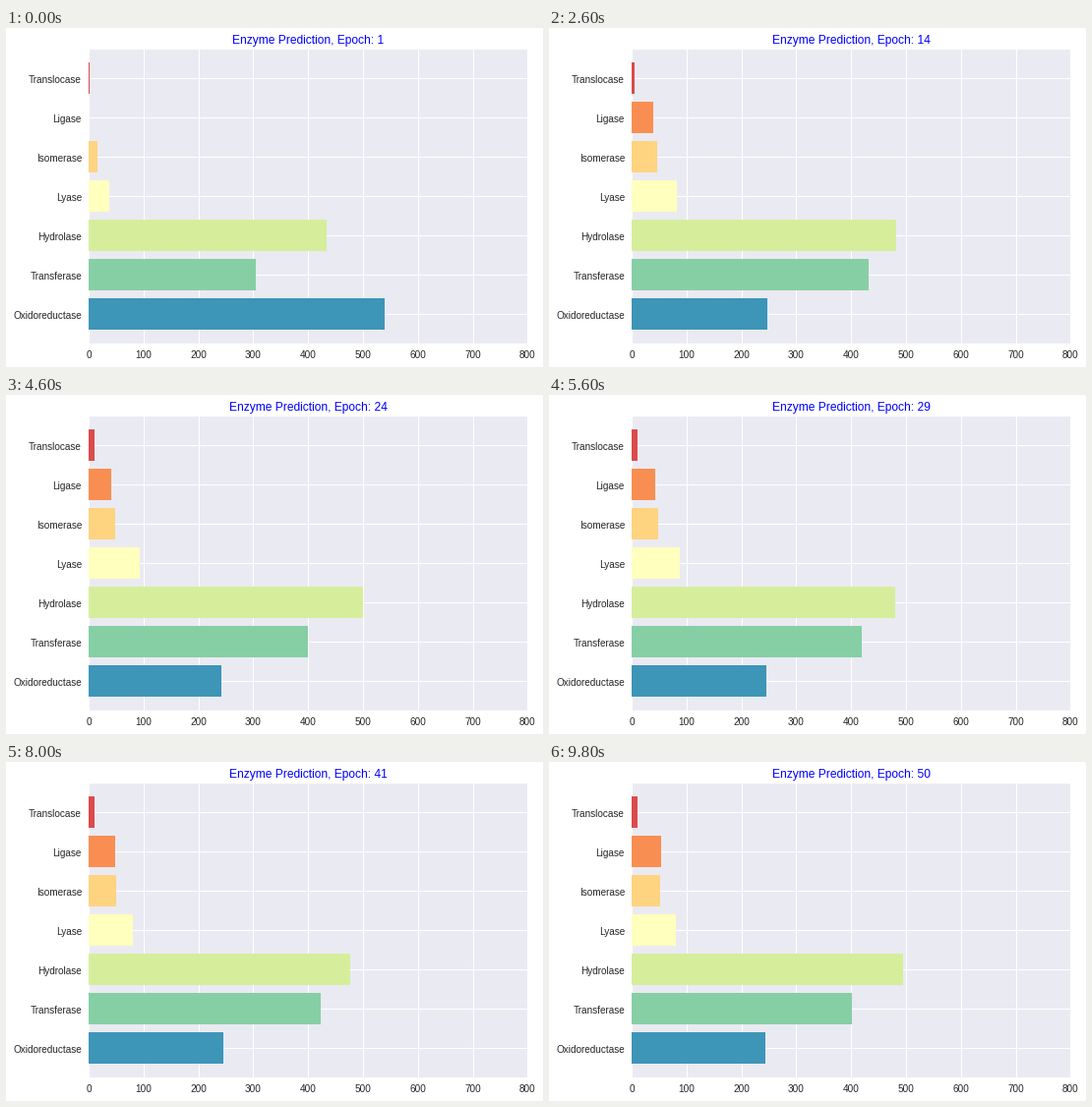
A matplotlib script for the animation above (10 s loop, 546 px wide and 345 px high).

```python
import matplotlib.pyplot as plt
import numpy as np
from matplotlib.animation import FuncAnimation
from matplotlib.transforms import ScaledTranslation

W, H, DPI = 546, 345, 72
EPOCHS, INTERVAL = 50, 200
SAMPLES = 1334
INK = "#262626"

plt.rcParams.update({
    "font.family": "Liberation Sans",
    "font.size": 10,
    "axes.titlesize": 12,
})

NAMES = ["Oxidoreductase", "Transferase", "Hydrolase", "Lyase",
         "Isomerase", "Ligase", "Translocase"]

epoch = np.arange(1, EPOCHS + 1)


def settle(start, end, tau):
    """Decay from start towards end, with tau in epochs."""
    return end + (start - end) * np.exp(-(epoch - 1) / tau)


def predict():
    """Counts per epoch and class; hydrolase takes every remaining sample."""
    progress = epoch / EPOCHS
    wave = np.cos(2 * np.pi * (epoch - 10.8) / 24.5)
    noise = np.random.default_rng(4).normal(0, 4, EPOCHS) * settle(0, 1, 2)

    oxidoreductase = settle(542, 245, 0.8) + 3 * wave
    transferase = settle(320, 418, 2) + 18 * wave + noise
    lyase = settle(38, 80, 5) + 14 * np.exp(-((epoch - 22) / 6) ** 2 / 2)
    isomerase = settle(16, 44 + 8 * progress, 2)
    ligase = settle(0, 38 + 15 * progress ** 2, 1.8)
    late = 11 * (1 - np.exp(-(epoch - 10) / 7))
    translocase = np.maximum(late, settle(2, 0, 0.5))

    others = [oxidoreductase, transferase, lyase, isomerase, ligase, translocase]
    counts = list(np.rint(others))
    counts.insert(2, SAMPLES - np.sum(counts, axis=0))
    return np.transpose(counts)


counts = predict()

fig = plt.figure(figsize=(W / DPI, H / DPI), dpi=DPI, facecolor="white")
ax = fig.add_axes([84 / W, 24.2 / H, 446.4 / W, 298.98 / H], facecolor="#EAEAF2")
colors = plt.get_cmap("Spectral")(np.linspace(0, 1, 9)[1:-1])[::-1]
bars = ax.barh(NAMES, counts[0], color=colors, linewidth=0)

ax.set_xlim(0, 800)
ax.set_ylim(-0.74, 6.74)
ax.set_axisbelow(True)
ax.grid(color="white", linewidth=1)
ax.tick_params(length=0, pad=7, labelcolor=INK)
for spine in ax.spines.values():
    spine.set_visible(False)
title = ax.set_title("", color="blue", pad=6)

# Seat the class names one pixel lower on their bars.
nudge = ScaledTranslation(0, -1 / DPI, fig.dpi_scale_trans)
for label in ax.get_yticklabels():
    label.set_transform(label.get_transform() + nudge)


def draw(i):
    for bar, count in zip(bars, counts[i]):
        bar.set_width(count)
    title.set_text(f"Enzyme Prediction, Epoch: {epoch[i]}")
    return [*bars, title]


anim = FuncAnimation(fig, draw, frames=EPOCHS, interval=INTERVAL,
                     init_func=lambda: draw(0), repeat=True, repeat_delay=0)
plt.show()
```
